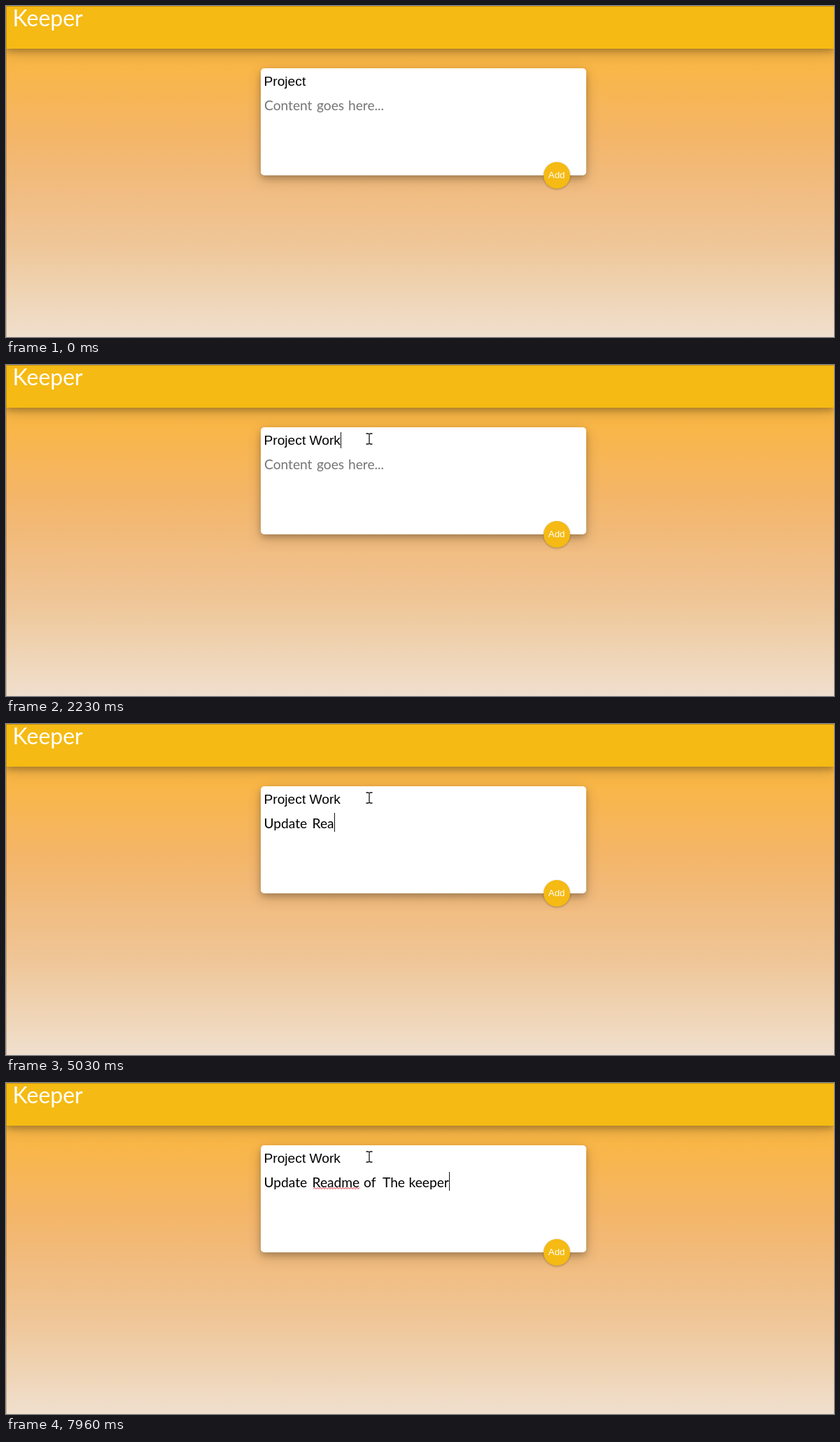
Write an HTML page that moves like this. It is 1183 px wide and 473 px high and loops after 8000 ms.

```html
<!DOCTYPE html>
<html lang="en">
<head>
<meta charset="utf-8">
<title>Keeper</title>
<style>
  html, body { margin: 0; width: 100%; height: 100%; overflow: hidden; }
  body {
    position: relative;
    background: linear-gradient(#f8b73a 0, #f9b648 90px, #f4b566 180px, #f1bc80 260px,
      #efc698 340px, #efd2b0 400px, #f0dfce 473px);
  }
  div, svg { position: absolute; }
  .header, .note { box-shadow: 0 4px 8px rgba(0,0,0,.2), 0 6px 20px rgba(0,0,0,.19); }
  .header { left: 0; top: 0; width: 100%; height: 60.5px; background: #f5ba13; }
  .note { left: 364px; top: 89px; width: 465px; height: 152.5px; border-radius: 5px; background: #fff; }
  .add {
    left: 767.5px; top: 222.5px; width: 38.5px; height: 38.5px; border-radius: 50%;
    background: #f5ba13; box-shadow: 0 1px 3px rgba(0,0,0,.3);
  }
  .edge { inset: 0; border: solid rgba(90,50,0,.3); border-width: 1px 0 0 1px; }
  svg { left: 0; top: 0; }
  text { font: 19.2px Lato, sans-serif; }
  #title { font-family: "Liberation Sans", Arial, sans-serif; }
</style>
</head>
<body>
<div class="header"></div>
<div class="note"></div>
<div class="add"></div>
<div class="edge"></div>
<svg width="1183" height="473" viewBox="0 0 1183 473">
  <text x="9.5" y="29" fill="#fff" style="font-size:32px">Keeper</text>
  <text x="774.8" y="246" fill="#fff" style="font:13.33px 'Liberation Sans',Arial,sans-serif">Add</text>
  <text id="title" x="368.5" y="114" xml:space="preserve"></text>
  <g id="hint" fill="#757575">
    <text x="369" y="148.5">Content</text>
    <text x="444" y="148.5">goes</text>
    <text x="489" y="148.5">here...</text>
  </g>
  <g id="body"></g>
  <path id="squiggle" fill="none" stroke="#e8202a"/>
  <rect id="caret" width="1" fill="#111"/>
  <g id="pointer">
    <path id="arrow" d="M0 0V16.5L4 13L6.6 19L9.2 18L6.6 12H11.7Z" fill="#fff" stroke="#000"/>
    <path id="beam" d="M-4.5-7.5H-1.5L0-6.5L1.5-7.5H4.5M0-7V7M-4.5 7.5H-1.5L0 6.5L1.5 7.5H4.5"
      fill="none" stroke="#111" stroke-width="1.3"/>
  </g>
</svg>
<script>
const LOOP = 8000;
const $ = id => document.getElementById(id);
const show = (id, on) => $(id).setAttribute('visibility', on ? 'visible' : 'hidden');
const set = (el, attrs) => { for (const k in attrs) el.setAttribute(k, attrs[k]); };

// n evenly spaced key presses from a to b
const run = (a, b, n) => Array.from({ length: n }, (_, i) => a + (b - a) * i / (n - 1));
const typed = (keys, t) => keys.filter(k => k <= t + 0.01).length;

const heading = 'Project Work';
const headingKeys = [1070, 1720, ...run(1990, 2230, 3)];
const noteKeys = [
  ...run(3250, 4220, 8).slice(1), ...run(4480, 4700, 2), ...run(5030, 5920, 6),
  ...run(6260, 7260, 7), ...run(7360, 7960, 5)
];

let offset = 0;
const words = [['Update', 368.5], ['Readme', 437.5], ['of', 511], ['The', 538], ['keeper', 575.5]]
  .map(([text, x]) => {
    const el = document.createElementNS('http://www.w3.org/2000/svg', 'text');
    set(el, { x, y: 148.5 });
    $('body').append(el);
    const word = { text, x, el, start: offset };
    offset += text.length + 1;
    return word;
  });

set($('squiggle'), { d: 'M439 151.5' + 'l2-2l2 2'.repeat(16) + 'l2-2' });

function drawPointer(t) {
  const p = Math.max(0, Math.min(1, Math.floor((t - 190) / 40) / 12));
  const e = 1 - (1 - p) ** 2;
  const x = 954 - 435 * e, y = 407 - 301.5 * e;
  const inNote = x > 364 && x < 829 && y > 89 && y < 241;
  set($('pointer'), { transform: `translate(${x} ${y})` });
  show('arrow', t >= 190 && !inNote);
  show('beam', t >= 190 && inNote);
}

function drawText(t) {
  $('title').textContent = heading.slice(0, 7 + typed(headingKeys, t));
  const n = typed(noteKeys, t);
  let end = 368.5;
  for (const w of words) {
    w.el.textContent = w.text.slice(0, Math.max(0, n - w.start));
    if (n === w.start) end = w.x;
    else if (n > w.start) end = w.x + w.el.getComputedTextLength();
  }
  show('hint', n === 0);
  show('squiggle', n >= words[2].start);

  const inTitle = t < 2460;
  const x = inTitle ? 368.5 + $('title').getComputedTextLength() : end;
  set($('caret'), { x: Math.round(x), y: inTitle ? 96 : 127, height: inTitle ? 23 : 27 });
  show('caret', t >= 940 && !(t >= 1570 && t < 1720) && !(t >= 2870 && t < 3250));
}

const began = performance.now();
function frame() {
  const t = (performance.now() - began) % LOOP;
  drawPointer(t);
  drawText(t);
  requestAnimationFrame(frame);
}
frame();
</script>
</body>
</html>
```
